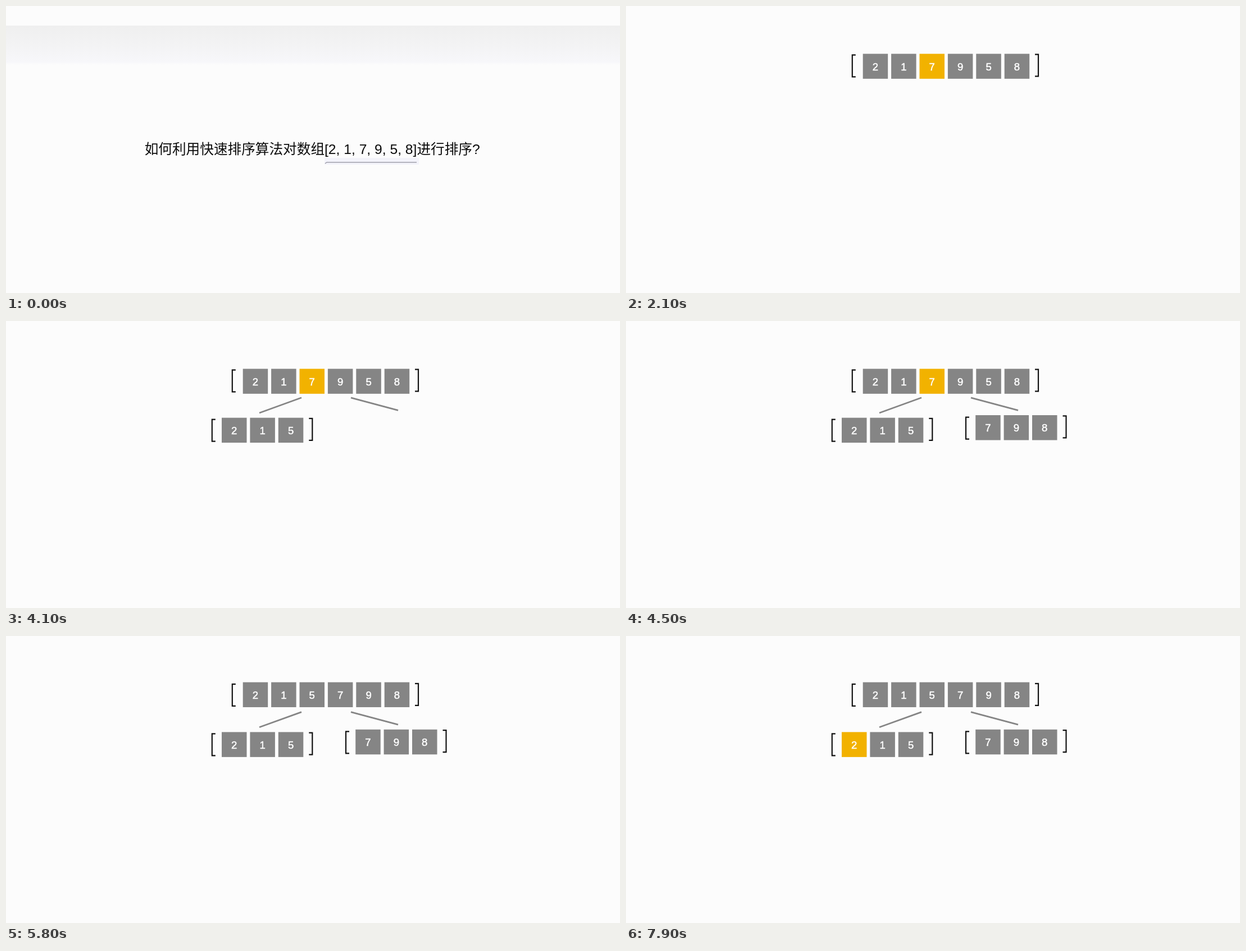
Animation, 1093 px wide and 512 px high, one loop 8 s. Source, as an HTML page with a canvas:

```html
<!DOCTYPE html>
<html lang="zh-CN">
<head>
<meta charset="utf-8">
<title>快速排序</title>
<style>
html, body { margin: 0; width: 100%; height: 100%; overflow: hidden; background: #fcfcfc; }
canvas { display: block; }
</style>
</head>
<body>
<canvas id="stage" width="1093" height="512"></canvas>
<script>
const ctx = document.getElementById('stage').getContext('2d');
const LOOP = 8000, STEP = 100, TILE = 44.5, PITCH = 50.4;
const GRAY = [133, 133, 133], YELLOW = [242, 178, 0];
const FONT = '"Liberation Sans", "Noto Sans CJK SC", "Noto Sans CJK", sans-serif';

const ramp = (t, a, b) => Math.min(1, Math.max(0, (t - a) / (b - a)));
const ease = (t, a, b) => { const p = ramp(t, a, b); return p * p * (3 - 2 * p); };
const mix = (a, b, p) => `rgb(${a.map((v, i) => Math.round(v + (b[i] - v) * p))})`;

function withAlpha(alpha, draw) {
  if (alpha <= 0) return;
  ctx.save();
  ctx.globalAlpha = alpha;
  draw();
  ctx.restore();
}

function tile(digit, x, y, glow = 0) {
  ctx.fillStyle = mix(GRAY, YELLOW, glow);
  ctx.fillRect(x, y, TILE, TILE);
  ctx.font = '18.5px ' + FONT;
  ctx.textAlign = 'center';
  ctx.fillStyle = ctx.strokeStyle = '#fff';
  ctx.lineWidth = 0.5;
  ctx.fillText(digit, x + TILE / 2, y + 29.2);
  ctx.strokeText(digit, x + TILE / 2, y + 29.2);
}

// dir 1 opens to the right, -1 to the left
function bracket(x, y, dir) {
  ctx.strokeStyle = '#111';
  ctx.lineWidth = 2.2;
  ctx.beginPath();
  ctx.moveTo(x + 6 * dir, y + 1);
  ctx.lineTo(x, y + 1);
  ctx.lineTo(x, y + 40);
  ctx.lineTo(x + 6 * dir, y + 40);
  ctx.stroke();
}

function brackets(x1, y1, x2, y2) {
  bracket(x1, y1, 1);
  bracket(x2, y2, -1);
}

function branch(x1, y1, x2, y2, p) {
  if (p <= 0) return;
  ctx.strokeStyle = '#858585';
  ctx.lineWidth = 2.8;
  ctx.beginPath();
  ctx.moveTo(x1, y1);
  ctx.lineTo(x1 + (x2 - x1) * p, y1 + (y2 - y1) * p);
  ctx.stroke();
}

function question() {
  ctx.font = '300 24.65px ' + FONT;
  ctx.textAlign = 'left';
  ctx.fillStyle = '#0a0a0a';
  ctx.fillText('如何利用快速排序算法对数组[2, 1, 7, 9, 5, 8]进行排序?', 246.7, 263.5);
}

function headerBand() {
  const g = ctx.createLinearGradient(0, 35, 0, 105);
  g.addColorStop(0, '#efefef');
  g.addColorStop(0.5, '#f3f3f4');
  g.addColorStop(0.92, '#f7f7fa');
  g.addColorStop(1, '#fcfcfc');
  ctx.fillStyle = g;
  ctx.fillRect(0, 35, 1093, 70);
}

function underline() {
  ctx.fillStyle = '#f3f3fa';
  ctx.fillRect(567, 271, 168, 12);
  ctx.strokeStyle = '#8e8e9a';
  ctx.lineWidth = 1.2;
  ctx.beginPath();
  ctx.moveTo(568, 281);
  ctx.lineTo(571, 278.8);
  ctx.lineTo(731, 278.8);
  ctx.stroke();
}

function mainRow(swap) {
  const y = 85.3 - 2.8 * swap, dy = -1.5 * swap;
  const at = (from, to = from) => 421.7 + PITCH * (from + (to - from) * swap);
  brackets(402.8, 86.3 + dy, 734, 85.4 + dy);
  tile(2, at(0), y);
  tile(1, at(1), y);
  tile(7, at(2, 3), y, 1 - swap);
  tile(5, at(4, 2), y);
  tile(9, at(3, 4), y);
  tile(8, at(5), y);
}

function subRow(digits, x, y, leftY, glow) {
  brackets(x - 17.2, y + leftY, x + 161.3, y + 0.3);
  digits.forEach((d, i) => tile(d, x + i * PITCH, y, i ? 0 : glow));
}

function render(t) {
  const arrive = ease(t, 700, 1200), swap = ease(t, 4600, 5500);
  const rise = 1.2 * swap;
  ctx.fillStyle = '#fcfcfc';
  ctx.fillRect(0, 0, 1093, 512);

  withAlpha(1 - ramp(t, 0, 200), headerBand);
  withAlpha(t < 100 ? 1 : 0, underline);
  withAlpha(1 - arrive, question);
  withAlpha(arrive, () => mainRow(swap));

  withAlpha(t < 5500 ? 1 - ramp(t, 4600, 4900) : ramp(t, 5600, 5800), () => {
    branch(526, 136.8 - rise, 451, 164 - rise, ease(t, 2700, 3300));
    branch(614, 136.8 - rise, 698, 159.4 - rise, ease(t, 3800, 4100));
  });
  withAlpha(ramp(t, 3400, 3600), () =>
    subRow([2, 1, 5], 384, 172.6 - rise, 2, ease(t, 7200, 7900)));
  withAlpha(ramp(t, 4200, 4500), () =>
    subRow([7, 9, 8], 622.2, 168 - rise, 2.6, 0));
}

const start = performance.now();
function frame() {
  const t = (performance.now() - start) % LOOP;
  render(Math.floor(t / STEP) * STEP);
  requestAnimationFrame(frame);
}
frame();
</script>
</body>
</html>
```
